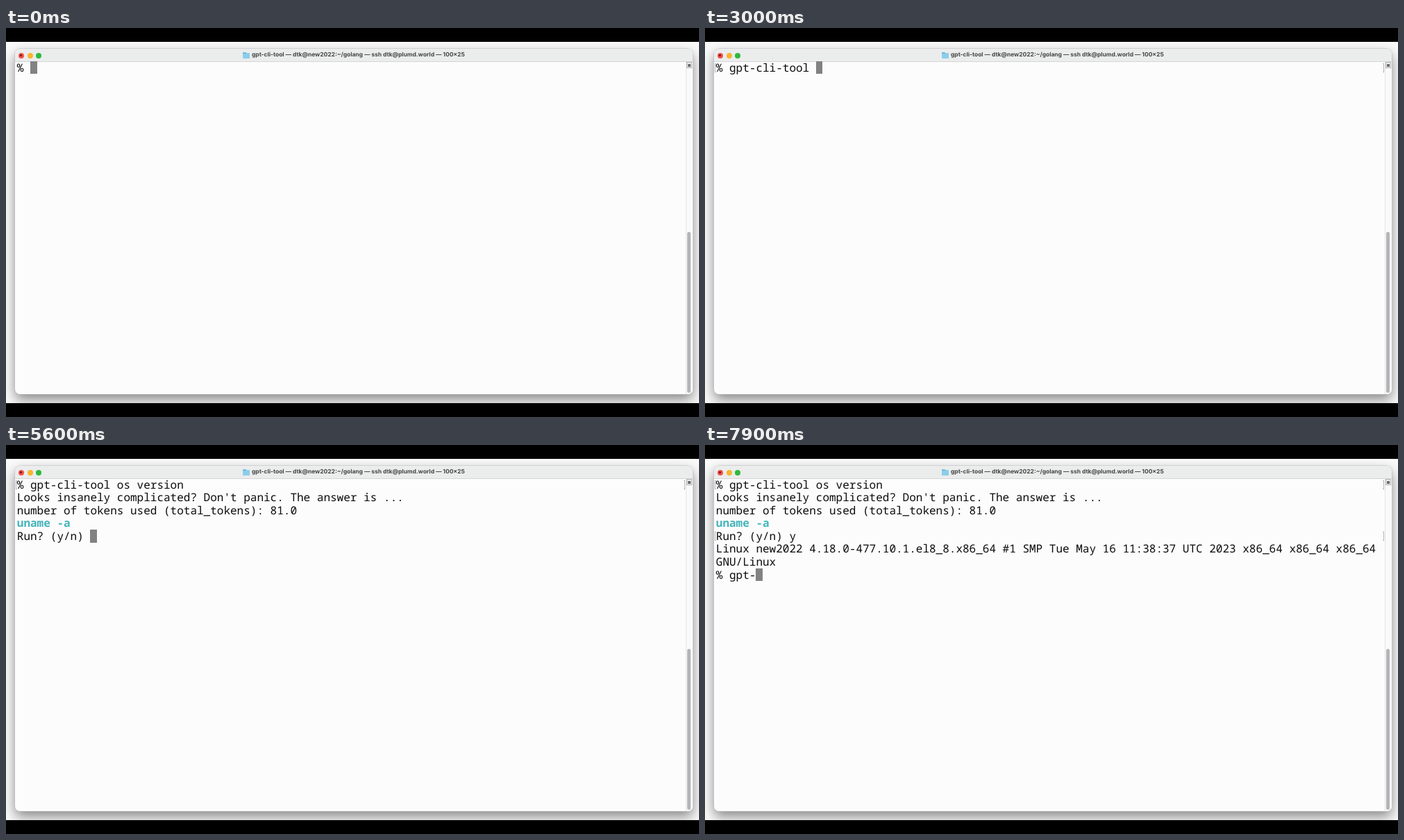
An HTML page for the animation above (8 s loop, 998x561 px).

```html
<!DOCTYPE html>
<html lang="en">
<head>
<meta charset="utf-8">
<title>Terminal session</title>
<style>
  html, body { margin: 0; width: 100%; height: 100%; overflow: hidden; background: #000; }
  #desk { position: absolute; top: 20px; width: 998px; height: 521px; overflow: hidden; background: #fafafa; }
  #desk *, #desk *::before { position: absolute; box-sizing: border-box; }
  #window { left: 13px; top: 10px; width: 976px; height: 498px; border-radius: 7px; background: #fcfcfc;
    box-shadow: 0 0 0 .6px #bcbcc6, 0 8px 18px rgba(0, 0, 0, .46); }
  #bar { width: 976px; height: 19px; border-radius: 7px 7px 0 0; background: #ebecec; border-bottom: 1px solid #d6d6da; }
  .light { top: 5.5px; width: 8px; height: 8px; border-radius: 50%; }
  #dot { left: 2.75px; top: 2.75px; width: 2.5px; height: 2.5px; border-radius: 50%; background: #7c1712; }
  #folder { left: 328px; top: 6px; width: 10px; height: 8px; border-radius: 1px; background: #8bcdeb; }
  #folder::before { content: ""; left: 0; top: -1px; width: 5px; height: 2px; border-radius: 1px; background: #6bb9dd; }
  #title { left: 341px; top: 0; white-space: pre; color: #454545;
    font: 700 8.44px/19px Inter, sans-serif; text-rendering: geometricPrecision; }
  #track { left: 965.5px; top: 19px; width: 10.5px; height: 479px; border-left: 1px solid #e4e4e8; background: #fafafa; border-radius: 0 0 7px 0; }
  #thumb { left: 968px; top: 264px; width: 5px; height: 232px; border-radius: 3px; background: #b5b5b7; }
  #split { left: 967px; top: 19px; width: 8px; height: 9px; border: 1px solid #b4b4b6; background: #ececec; }
  #split::before { content: ""; left: 1px; top: 1.5px; width: 4px; height: 4px; background: #6c6c6c; }
  #screen { left: 2.8px; top: 17.6px; margin: 0; color: #0c0c0c; white-space: pre;
    font: 500 16px/18.57px "Noto Sans Mono", "DejaVu Sans Mono", monospace;
    font-variant-ligatures: none; text-rendering: geometricPrecision; }
  #screen b { position: static; color: #45b4ba; font-weight: 600; }
  #cursor { width: 9.6px; height: 18.4px; background: #828282; }
  .mark { left: 1px; width: 964px; height: 13px; visibility: hidden; }
  .mark i { top: 0; width: 2px; height: 13px; border: solid #b4b4b8; border-width: 1px 0 1px 1px; }
  .mark i + i { right: 0; border-width: 1px 1px 1px 0; }
</style>
</head>
<body>
<div id="desk">
  <div id="window">
    <div id="bar">
      <div class="light" style="left:4.7px;background:#f0524b"><div id="dot"></div></div>
      <div class="light" style="left:17.5px;background:#f7b52f"></div>
      <div class="light" style="left:30.3px;background:#2fb93f"></div>
      <div id="folder"></div>
      <div id="title">gpt-cli-tool — dtk@new2022:~/golang — ssh dtk@plumd.world — 100×25</div>
    </div>
    <div id="track"></div>
    <div id="thumb"></div>
    <div id="split"></div>
    <div id="cursor"></div>
    <pre id="screen"></pre>
    <div class="mark" style="top:21px"><i></i><i></i></div>
    <div class="mark" style="top:95px"><i></i><i></i></div>
  </div>
</div>
<script>
const LOOP = 8000, CELL = 9.6, ROW = 18.57;
const screen = document.getElementById('screen');
const cursor = document.getElementById('cursor');
const marks = document.querySelectorAll('.mark');

// [start, end, text]: characters appear evenly, the last one at end
const command = [[1400, 2000, 'gpt-'], [2100, 2700, 'cli-tool'], [3000, 3000, ' '], [3100, 4400, 'os version']];
const answer = [[5900, 5900, 'y']];
const nextCommand = [[7400, 7900, 'gpt-']];

function typed(parts, t) {
  return parts.map(([start, end, text]) => {
    if (t < start) return '';
    const step = (end - start) / Math.max(1, text.length - 1) || 1;
    return text.slice(0, Math.floor((t - start) / step + 1.001));
  }).join('');
}

function linesAt(t) {
  const lines = ['% ' + typed(command, t)];
  if (t >= 5100) lines.push("Looks insanely complicated? Don't panic. The answer is ...");
  if (t >= 5400) lines.push('number of tokens used (total_tokens): 81.0', 'uname -a', 'Run? (y/n) ' + typed(answer, t));
  if (t >= 6200) lines.push(
    'Linux new2022 4.18.0-477.10.1.el8_8.x86_64 #1 SMP Tue May 16 11:38:37 UTC 2023 x86_64 x86_64 x86_64',
    'GNU/Linux', '% ' + typed(nextCommand, t));
  // an empty line waits for output after Return
  if (t >= 4900 && t < 5400 || t >= 6100 && t < 6200) lines.push('');
  return lines;
}

let shown = null;
function draw(now) {
  const t = now % LOOP, lines = linesAt(t), row = lines.length - 1;
  const html = lines.map(line => line === 'uname -a' ? `<b>${line}</b>` : line).join('\n');
  if (html !== shown) screen.innerHTML = shown = html;
  cursor.style.left = 2.8 + lines[row].length * CELL + 'px';
  cursor.style.top = 18 + row * ROW + 'px';
  marks[0].style.visibility = t >= 2400 ? 'visible' : 'hidden';
  marks[1].style.visibility = t >= 6100 ? 'visible' : 'hidden';
  requestAnimationFrame(draw);
}
draw(performance.now());
</script>
</body>
</html>
```
